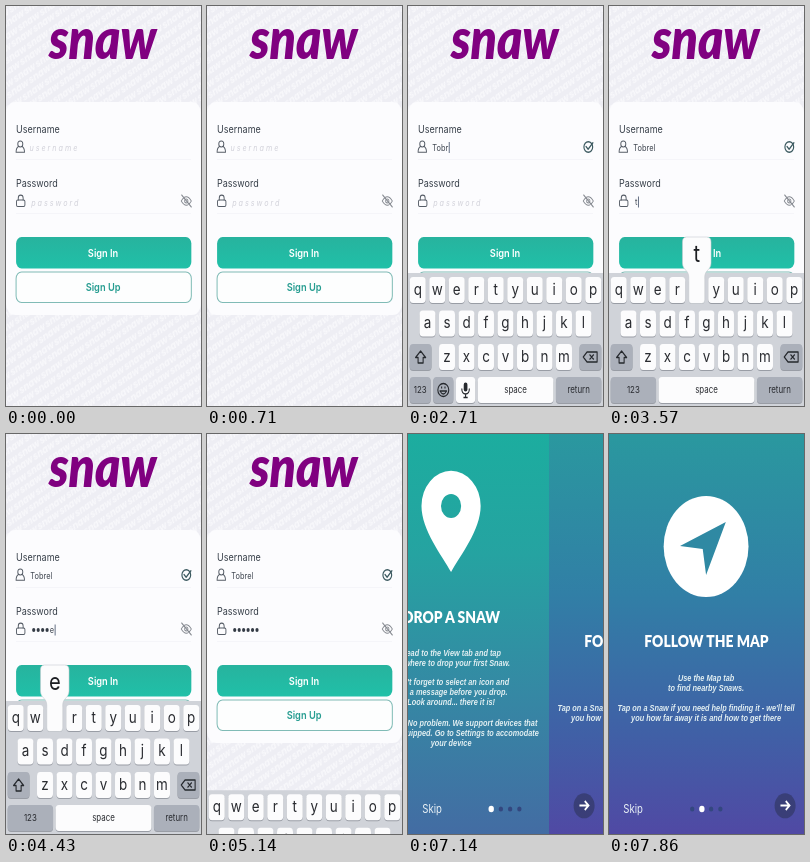
Recreate the animation shown at these times as an HTML page. Size 195 by 400 pixels, loop 8 s.

```html
<!DOCTYPE html>
<html lang="en">
<head>
<meta charset="utf-8">
<title>Sign in and onboarding</title>
<style>
  html, body { margin: 0; width: 100%; height: 100%; overflow: hidden; background: #eeeef5; }
  svg { display: block; width: 100vw; height: 100vh; font-family: Inter, Roboto, sans-serif; }
  .mid { text-anchor: middle; }
  .logo { font: italic 900 57px Lato, sans-serif; fill: #800080; }
  .label { font-size: 10.7px; fill: #3a424c; }
  .hint { font-size: 8.6px; fill: #d2d2da; letter-spacing: 2.3px; font-style: italic; }
  .value { font-size: 8.8px; fill: #3f4650; }
  .icon { fill: none; stroke: #555c66; stroke-width: 1.1; stroke-linecap: round; stroke-linejoin: round; }
  .button { font-size: 11px; font-weight: 600; }
  .key { font-size: 16px; fill: #2a2c31; }
  .word { font-size: 9.4px; fill: #2a2c31; }
  .title { font: 900 16.5px Lato, sans-serif; fill: #fff; }
  .copy { font: italic bold 8.75px "Liberation Sans", Arial, sans-serif; fill: #e2eff2; }
</style>
</head>
<body>
<svg viewBox="0 0 232 400" preserveAspectRatio="none">
  <defs>
    <pattern id="paper" width="30" height="21" patternUnits="userSpaceOnUse" patternTransform="rotate(-30)">
      <rect width="30" height="21" fill="#eeeef4"/>
      <g font-size="11" font-style="italic" font-weight="700" fill="#f9f9fc">
        <text x="1" y="8.5">snaw</text>
        <text x="-14" y="19">snaw</text>
        <text x="16" y="19">snaw</text>
      </g>
    </pattern>
    <linearGradient id="teal" x2="0" y2="1">
      <stop stop-color="#27b39e"/><stop offset="1" stop-color="#20c0a8"/>
    </linearGradient>
    <linearGradient id="sky1" x2="0" y2="1">
      <stop stop-color="#1cad9f"/><stop offset=".3" stop-color="#25a3a1"/>
      <stop offset=".65" stop-color="#3588a4"/><stop offset="1" stop-color="#436ca3"/>
    </linearGradient>
    <linearGradient id="sky2" x2="0" y2="1">
      <stop stop-color="#2a989f"/><stop offset=".4" stop-color="#317fa6"/>
      <stop offset=".75" stop-color="#4060a6"/><stop offset="1" stop-color="#5049a4"/>
    </linearGradient>
  </defs>

  <g id="login">
    <rect width="232" height="400" fill="url(#paper)"/>
    <text class="logo mid" x="115" y="53">snaw</text>
    <rect y="96" width="232" height="213" rx="11" fill="#fcfcfe"/>
    <text class="label" x="12" y="127">Username</text>
    <text class="label" x="12" y="181">Password</text>
    <path d="M12 153.5H220M12 207.5H220" stroke="#f5f5f9"/>
    <g class="icon">
      <circle cx="17" cy="138" r="3"/>
      <path d="M14.8 140.6Q12 142 12 146.3H22Q22 142 19.2 140.6"/>
      <rect x="12.5" y="194" width="10" height="6.5" rx="1.5"/>
      <path d="M14.6 194V192A2.9 2.9 0 0 1 20.4 192V194"/>
    </g>
    <g class="icon" style="stroke:#868a91">
      <path d="M208.5 195Q214.5 186.5 220.5 195Q214.5 203.5 208.5 195ZM209 189L220.5 201"/>
      <circle cx="214.5" cy="195" r="2"/>
    </g>
    <g id="tick" class="icon" style="stroke-width:1.4">
      <circle cx="214.5" cy="141" r="5.2"/><path d="M211.8 140.5L214.3 143.2L220 136.8"/>
    </g>
    <text id="nameHint" class="hint" x="28" y="145">username</text>
    <text id="passHint" class="hint" x="30" y="200">password</text>
    <text id="name" class="value" x="29" y="145"></text>
    <text id="pass" class="value" y="199.5"></text>
    <g id="dots" fill="#333a44"></g>
    <rect id="caret" width="1" height="11" fill="#48566e"/>
    <rect x="12" y="231" width="208.5" height="31.5" rx="6.5" fill="url(#teal)"/>
    <text class="button mid" x="115.5" y="251" fill="#fff">Sign In</text>
    <rect x="12" y="266" width="208.5" height="30.5" rx="6.5" fill="#fdfefe" stroke="#80bbb6" stroke-width="1.2"/>
    <text class="button mid" x="115.5" y="285" fill="#279d91">Sign Up</text>
  </g>

  <g id="board">
    <rect y="267" width="232" height="134" fill="#d0d3d9"/>
    <g id="keys"></g>
    <g id="nameRow"></g>
    <g id="passRow"></g>
    <g id="popup">
      <path d="M-12 231H12Q17 231 17 236V257C17 264 9.5 264 9.5 271V294Q9.5 297.5 6 297.5H-6Q-9.5 297.5 -9.5 294V271C-9.5 264 -17 264 -17 257V236Q-17 231 -12 231Z" fill="#fcfcfd" stroke="#c2c6cd" stroke-width=".6"/>
      <text id="popChar" class="mid" y="256" font-size="24" fill="#1c1e22"></text>
    </g>
  </g>

  <g id="tour">
    <g id="page1">
      <rect width="233" height="400" fill="url(#sky1)"/>
      <path fill="#fff" fill-rule="evenodd" d="M115.5 138C105 122 80.3 96 80.3 72A35.2 35.2 0 0 1 150.7 72C150.7 96 126 122 115.5 138ZM103.5 72a12 12 0 0 0 24 0a12 12 0 0 0 -24 0Z"/>
      <text class="title mid" x="116" y="189">DROP A SNAW</text>
    </g>
    <g id="page2">
      <rect width="232" height="400" fill="url(#sky2)"/>
      <circle cx="115.5" cy="112.5" r="50.5" fill="#fff"/>
      <path d="M139 88L115.5 141L111.5 115L84.5 112Z" fill="#2f89a3"/>
      <text class="title mid" x="116" y="213">FOLLOW THE MAP</text>
    </g>
    <text x="17" y="379" font-size="11.4" fill="#eaf2f7">Skip</text>
    <g id="bullets"></g>
    <circle cx="209.5" cy="371.8" r="12.5" fill="#2f3560" opacity=".65"/>
    <path d="M204 371.5H214.5M210.3 367L214.8 371.5L210.3 376" fill="none" stroke="#fff" stroke-width="2"/>
  </g>
</svg>
<script>
const $ = id => document.getElementById(id);
const NS = "http://www.w3.org/2000/svg";
const LOOP = 8000, FPS = 7, W = 232;
const NAME = "Tobrel", PASS = "tunder";
const nameSteps = [12, 15, 17, 18, 20, 21];
const passSteps = [25, 27, 28, 30, 31, 32];
const rows = ["qwertyuiop", "asdfghjkl", "zxcvbnm"];
const keyPos = {}, caps = [];
const passX = i => 31 + i * 5.3;

function add(parent, tag, attrs, text) {
  const node = document.createElementNS(NS, tag);
  for (const k in attrs) node.setAttribute(k, attrs[k]);
  if (text) node.textContent = text;
  parent.appendChild(node);
  return node;
}
const show = (node, on) => node.setAttribute("display", on ? "inline" : "none");
const move = (node, x, y) => node.setAttribute("transform", `translate(${x} ${y})`);

function keyCap(parent, x, y, w, fill) {
  add(parent, "rect", { x, y: y + 1, width: w, height: 26, rx: 4, fill: "#999da5" });
  add(parent, "rect", { x, y, width: w, height: 26, rx: 4, fill });
}
function wordKey(parent, x, w, text, fill = "#abb0ba") {
  keyCap(parent, x, 371, w, fill);
  add(parent, "text", { x: x + w / 2, y: 387.5, class: "word mid" }, text);
}
const glyph = (parent, d) =>
  add(parent, "path", { d, fill: "none", stroke: "#25282d", "stroke-width": 1.3, "stroke-linejoin": "round" });

function buildKeyboard() {
  const keys = $("keys");
  rows.forEach((row, r) => [...row].forEach((ch, i) => {
    const x = [11.6, 23.2, 46.4][r] + i * 23.2, y = 271 + r * 33.5;
    keyCap(keys, x - 9.5, y, 19, "#fcfcfd");
    caps.push([add(keys, "text", { x, y: y + 18, class: "key mid" }, ch), ch]);
    keyPos[ch] = [x, y - 271];
  }));
  keyCap(keys, 2, 338, 26, "#abb0ba");
  keyCap(keys, 204, 338, 26, "#abb0ba");
  glyph(keys, "M15 345L21 351.5H18V357H12V351.5H9Z");
  glyph(keys, "M208.5 351L213 346H225V356H213ZM216 348.5L221 353.5M221 348.5L216 353.5");
  wordKey(keys, 176, 54, "return");

  const a = $("nameRow"), b = $("passRow");
  wordKey(a, 2, 25, "123");
  keyCap(a, 30, 371, 24, "#abb0ba");
  glyph(a, "M35.5 384a6.5 6.5 0 0 0 13 0a6.5 6.5 0 0 0 -13 0M38 385Q42 391 46 385ZM40 380.5V382.5M44 380.5V382.5");
  keyCap(a, 57, 371, 23, "#fcfcfd");
  add(a, "rect", { x: 66.3, y: 376.5, width: 4.4, height: 9, rx: 2.2, fill: "#25282d" });
  glyph(a, "M64 382.5Q64 388 68.5 388T73 382.5M68.5 388V391.5M66 391.5H71");
  wordKey(a, 83, 90, "space", "#fcfcfd");
  wordKey(b, 2, 54, "123");
  wordKey(b, 59, 114, "space", "#fcfcfd");
}

function addCopy(page, lines) {
  for (const [y, text] of lines) add(page, "text", { x: 115.5, y, class: "copy mid" }, text);
}

buildKeyboard();
addCopy($("page1"), [
  [222, "Head to the View tab and tap"],
  [232, "anywhere to drop your first Snaw."],
  [251.5, "Don't forget to select an icon and"],
  [261.5, "add a message before you drop."],
  [271.5, "Look around... there it is!"],
  [292, "Old phone? No problem. We support devices that"],
  [302, "aren't AR-equipped. Go to Settings to accomodate"],
  [312, "your device"]
]);
addCopy($("page2"), [
  [247, "Use the Map tab"],
  [257, "to find nearby Snaws."],
  [277, "Tap on a Snaw if you need help finding it - we'll tell"],
  [287, "you how far away it is and how to get there"]
]);
const stars = [...PASS].map((_, i) => add($("dots"), "circle", { cx: passX(i) + 2, cy: 196, r: 1.9 }));
const bullets = [99, 110.5, 121.5, 132.5].map(cx => add($("bullets"), "circle", { cx, cy: 375 }));

// Eased 0..1 progress of a move that starts at `from`
function ease(t, from, span) {
  const p = Math.min(1, Math.max(0, (t - from) / span));
  return p < .5 ? 2 * p * p : 1 - 2 * (1 - p) ** 2;
}
const typed = (steps, k) => steps.filter(s => s <= k).length;

function drawLogin(t, k) {
  const n = typed(nameSteps, k), m = typed(passSteps, k);
  const onPass = k >= 23, focus = t >= 860 && t < 4995;
  const bare = m && k - passSteps[m - 1] < 2;
  const hidden = bare ? m - 1 : m;

  show($("nameHint"), !n);
  show($("passHint"), !m);
  $("name").textContent = NAME.slice(0, n);
  $("pass").textContent = bare ? PASS[m - 1] : "";
  $("pass").setAttribute("x", passX(hidden));
  stars.forEach((s, i) => show(s, i < hidden));
  show($("tick"), n);
  $("tick").style.stroke = n > 2 ? "#3c5a60" : "#d3d5da";

  const field = $(onPass ? "pass" : "name");
  const end = field.textContent ? field.getComputedTextLength() : 0;
  const caret = $("caret");
  show(caret, focus);
  caret.setAttribute("x", (onPass ? passX(hidden) : 29) + end + .6);
  caret.setAttribute("y", onPass ? 190.5 : 136);

  const drop = 134 * (1 - ease(t, 860, 250) + ease(t, 4995, 250));
  move($("board"), 0, drop);
  show($("board"), drop < 134);
  show($("nameRow"), !onPass);
  show($("passRow"), onPass);
  for (const [node, ch] of caps) node.textContent = n ? ch : ch.toUpperCase();

  const i = nameSteps.indexOf(k), j = passSteps.indexOf(k);
  const hit = i >= 0 ? NAME[i] : j >= 0 ? PASS[j] : "";
  show($("popup"), hit);
  if (hit) {
    move($("popup"), ...keyPos[hit.toLowerCase()]);
    $("popChar").textContent = hit;
  }
}

function drawTour(t) {
  const rise = ease(t, 5600, 400), swipe = ease(t, 6994, 400);
  show($("tour"), rise > 0);
  move($("tour"), 0, 400 * (1 - rise));
  move($("page1"), -W * swipe, 0);
  move($("page2"), W * (1 - swipe), 0);
  const active = swipe > .5 ? 1 : 0;
  bullets.forEach((b, i) => {
    b.setAttribute("r", i === active ? 3.2 : 2.6);
    b.setAttribute("fill", i === active ? "#fff" : "#33477f");
  });
}

function render(now) {
  // The screen refreshes in even steps
  const k = Math.floor((now % LOOP + 5) * FPS / 1000) % (LOOP * FPS / 1000);
  const t = k * 1000 / FPS;
  drawLogin(t, k);
  drawTour(t);
}

let start;
function tick(now) {
  start ??= now;
  render(now - start);
  requestAnimationFrame(tick);
}
render(0);
requestAnimationFrame(tick);
</script>
</body>
</html>
```
